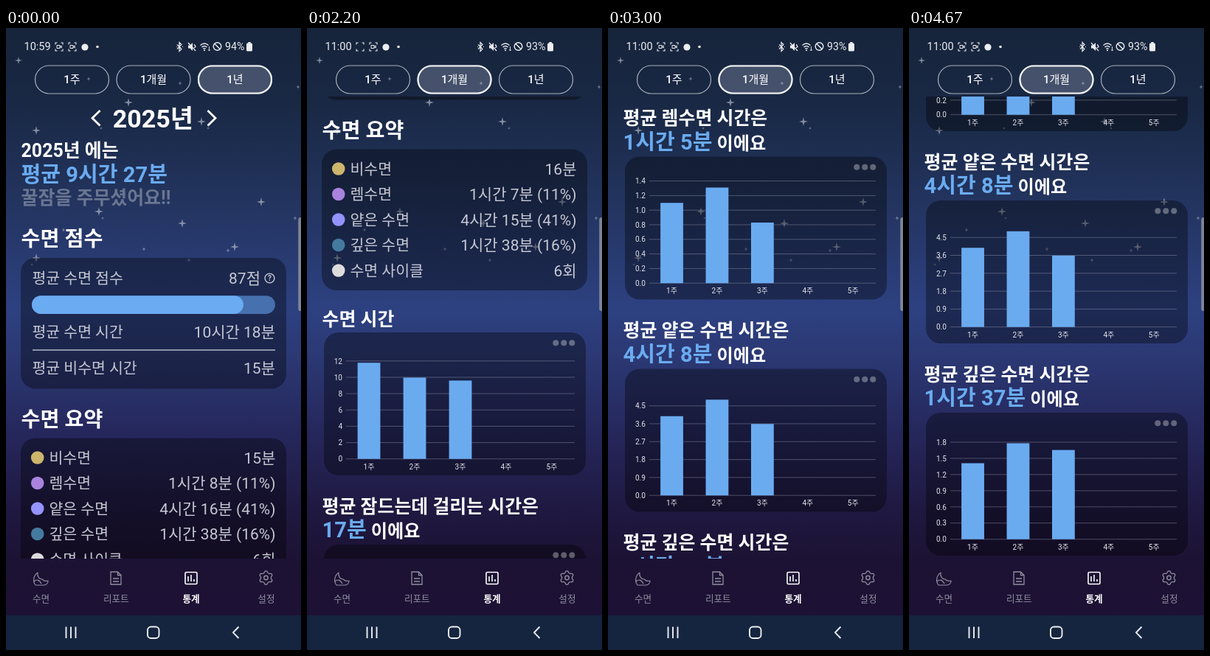
An HTML page for the animation above (5 s loop, 400x844 px).

```html
<!DOCTYPE html>
<html lang="ko">
<head>
<meta charset="utf-8">
<title>수면 통계</title>
<style>
html, body { margin: 0; width: 100%; height: 100%; overflow: hidden; background: #16243c; }
svg { display: block; width: 400px; height: 844px; }
text { font-family: Roboto, "Noto Sans CJK KR", "Noto Sans CJK", sans-serif; white-space: pre; }
</style>
</head>
<body>
<svg id="stage" viewBox="0 0 400 844">
  <defs>
    <linearGradient id="sky" x1="0" y1="0" x2="0" y2="1">
      <stop offset="0" stop-color="#16243b"/>
      <stop offset=".12" stop-color="#192844"/>
      <stop offset=".28" stop-color="#23345f"/>
      <stop offset=".45" stop-color="#2d4181"/>
      <stop offset=".53" stop-color="#2b3873"/>
      <stop offset=".66" stop-color="#25265a"/>
      <stop offset=".78" stop-color="#1f1840"/>
      <stop offset=".86" stop-color="#1c1233"/>
      <stop offset="1" stop-color="#1e1136"/>
    </linearGradient>
    <clipPath id="view"><rect y="93" width="400" height="627"/></clipPath>
  </defs>
  <rect width="400" height="844" fill="url(#sky)"/>
  <g id="stars" fill="#c9cdd8" opacity=".6"></g>
  <g clip-path="url(#view)"><g id="page"></g></g>
  <g id="chrome"></g>
</svg>
<script>
const LOOP = 5000, FRAME = 1000 / 15;
const BLUE = '#6aabf0', WHITE = '#fff', SOFT = '#c6c8d4', DIM = '#8f8e9f';
const LEFT = 20.6, BIG = 29.1, MID = 24.9, ROW = 20.5, VALUE = 21;
const $ = id => document.getElementById(id);

function add(parent, tag, attrs = {}) {
  const el = document.createElementNS('http://www.w3.org/2000/svg', tag);
  for (const key in attrs) el.setAttribute(key, attrs[key]);
  parent.appendChild(el);
  return el;
}
const rect = (p, x, y, width, height, rx, fill, more) =>
  add(p, 'rect', { x, y, width, height, rx, fill, ...more });
const dot = (p, cx, cy, r, fill, more) => add(p, 'circle', { cx, cy, r, fill, ...more });
const line = (p, d, stroke, width = 1, more) =>
  add(p, 'path', { d, stroke, 'stroke-width': width, fill: 'none', ...more });

// Text is placed by the vertical middle of its glyphs
function label(p, str, x, cy, size, fill = WHITE, weight = 400, anchor = 'start') {
  const el = add(p, 'text', {
    x, y: cy + size * 0.37, 'font-size': size, fill, 'font-weight': weight, 'text-anchor': anchor
  });
  el.textContent = str;
  return el;
}

// Background stars: x, y, radius
[[17, 44, 5], [41, 139, 6], [166, 101, 6], [265, 127, 6], [346, 236, 6], [126, 249, 6],
 [239, 265, 6], [310, 297, 6], [41, 312, 6], [112, 69, 3], [236, 75, 3], [396, 80, 3],
 [129, 136, 2], [274, 136, 2], [131, 258, 2], [78, 274, 3], [187, 300, 3], [301, 302, 3],
 [35, 321, 2], [392, 258, 3], [248, 315, 3]].forEach(([x, y, r]) => {
  const q = r * 0.2;
  add($('stars'), 'path', {
    d: `M${x} ${y - r}L${x + q} ${y - q}L${x + r} ${y}L${x + q} ${y + q}L${x} ${y + r}` +
       `L${x - q} ${y + q}L${x - r} ${y}L${x - q} ${y - q}Z`
  });
});

const page = $('page');
const card = (x, y, w, h) => rect(page, x, y, w, h, 20, '#000', { 'fill-opacity': 0.36 });

// Fixed parts of the summary
label(page, '꿀잠을 주무셨어요!!', LEFT, 230, MID, 'rgba(255,255,255,.33)', 700);
label(page, '수면 점수', LEFT, 286, 28.2, WHITE, 700);
card(20, 311.7, 360, 177.8);
['평균 수면 점수', '평균 수면 시간', '평균 비수면 시간'].forEach((s, i) =>
  label(page, s, 35.5, [339, 412, 461][i], ROW, SOFT));
label(page, '87점', 345, 339, VALUE, SOFT, 400, 'end');
dot(page, 357.5, 339.5, 6.4, 'none', { stroke: SOFT, 'stroke-width': 1.4 });
label(page, '?', 357.5, 339.5, 10, SOFT, 700, 'middle');
rect(page, 35, 363.2, 330, 24.8, 12.4, '#4670ae');
rect(page, 35, 363.2, 287, 24.8, 12.4, '#6aabf2');
line(page, 'M36 437H365', '#b4b8c8', 1.3);
label(page, '수면 요약', LEFT, 531, 28.2, WHITE, 700);
card(20, 556.5, 360, 191.5);

const rowY = i => 583 + i * 34.5;
[['비수면', '#cdb56c'], ['렘수면', '#a983dd'], ['얕은 수면', '#9493ff'],
 ['깊은 수면', '#457a9f'], ['수면 사이클', '#dcdcdc']].forEach(([name, color], i) => {
  dot(page, 42.7, rowY(i), 8.8, color);
  label(page, name, 58.5, rowY(i), ROW, SOFT);
});

// Values that depend on the chosen period
function period(title, half, intro, average, sleep, awake, rows) {
  const g = add(page, 'g');
  label(g, title, 199.5, 122, 34, WHITE, 700, 'middle');
  for (const side of [-1, 1]) {
    const x = 200.5 + side * half;
    line(g, `M${x - side * 10.5} 112L${x} 122.3L${x - side * 10.5} 132.6`, WHITE, 2.8);
  }
  label(g, intro, LEFT, 166, MID, WHITE, 700);
  label(g, average, LEFT, 198, BIG, BLUE, 700);
  label(g, sleep, 365, 412, VALUE, SOFT, 400, 'end');
  label(g, awake, 365, 461, VALUE, SOFT, 400, 'end');
  [awake, ...rows].forEach((s, i) => label(g, s, 365.5, rowY(i), VALUE, SOFT, 400, 'end'));
  return g;
}
const year = period('2025년', 83.5, '2025년 에는', '평균 9시간 27분', '10시간 18분', '15분',
  ['1시간 8분 (11%)', '4시간 16분 (41%)', '1시간 38분 (16%)', '6회']);
const month = period('2025년 5월', 113, '5월 한달 간', '평균 10시간 25분', '10시간 25분', '16분',
  ['1시간 7분 (11%)', '4시간 15분 (41%)', '1시간 38분 (16%)', '6회']);

// Bar chart card; gap is the distance between grid lines
function chart(top, step, count, gap, digits, values) {
  const left = digits ? 55.8 : 53, slot = (363 - left) / 5, zero = top + 171.7;
  card(23, top, 355, 194);
  for (let i = 0; i < 3; i++) dot(page, 337.3 + i * 11, top + 14.3, 4, WHITE, { opacity: 0.33 });
  for (let i = 0; i <= count; i++) {
    const y = zero - i * gap;
    line(page, `M${left} ${y}H363`, '#a4a6b8', 0.8, { opacity: 0.5 });
    label(page, (i * step).toFixed(digits), left - 5, y, 10, '#e4e5ec', 400, 'end');
  }
  for (let i = 0; i < 5; i++) {
    const x = left + slot * (i + 0.5), h = (values[i] || 0) / step * gap;
    if (h) rect(page, x - 15.4, zero - h, 30.8, h, 0, BLUE);
    label(page, i + 1 + '주', x, top + 182, 10, '#e4e5ec', 400, 'middle');
  }
}
function section(i, title, value, ...data) {
  const top = 1093 + i * 288;
  label(page, title, LEFT, top - 52.3, MID, WHITE, 700);
  const el = label(page, '', LEFT, top - 20.3, BIG, BLUE, 700);
  add(el, 'tspan').textContent = value;
  add(el, 'tspan', { 'font-size': 24.2, fill: WHITE }).textContent = ' 이에요';
  chart(top, ...data);
}
label(page, '수면 시간', LEFT, 787, MID, WHITE, 700);
chart(805, 2, 6, 22.15, 0, [11.78, 9.96, 9.6]);
section(0, '평균 잠드는데 걸리는 시간은', '17분', 4, 6, 21.76, 0, [14, 13, 23.2]);
section(1, '평균 렘수면 시간은', '1시간 5분', 0.2, 7, 19.8, 1, [1.1, 1.31, 0.83]);
section(2, '평균 얕은 수면 시간은', '4시간 8분', 0.9, 5, 24.3, 1, [3.98, 4.81, 3.59]);
section(3, '평균 깊은 수면 시간은', '1시간 37분', 0.3, 6, 21.95, 1, [1.41, 1.78, 1.655]);

// Period buttons
const chrome = $('chrome');
const buttons = ['1주', '1개월', '1년'].map((name, i) => {
  const x = 39.5 + i * 110.5;
  rect(chrome, x, 51, 100, 38, 19, 'none', { stroke: '#a9afbc', 'stroke-width': 1.2 });
  const lit = add(chrome, 'g', { opacity: 0 });
  rect(lit, x + 0.5, 51.5, 99, 37, 18.5, 'rgba(225,232,255,.22)', { stroke: '#f1f2f4', 'stroke-width': 2.2 });
  label(chrome, name, x + 50, 69.7, 15, WHITE, 500, 'middle');
  return lit;
});

// Status bar
const INK = '#eceef2';
const clock = label(chrome, '', 24.5, 25, 14.5, INK);
const battery = label(chrome, '', 297, 25, 14.2, INK);
const cams = [72, 90].map(x => {
  line(chrome, `M${x - 5} 22.5V20H${x - 2.5}M${x + 2.5} 20H${x + 5}V22.5M${x + 5} 28.5V31H${x + 2.5}` +
    `M${x - 2.5} 31H${x - 5}V28.5`, INK, 1.1);
  return line(chrome, `M${x - 3} 23.5H${x + 1}V27.5H${x - 3}ZM${x + 1} 25.5L${x + 3.2} 24V27Z`, INK, 1);
});
dot(chrome, 107, 26, 4.6, INK);
dot(chrome, 124, 25.5, 1.8, INK);
line(chrome, 'M232 22.5L238 28.5L235 31.5V19.5L238 22.5L232 28.5M231 25.5H231.8M239 25.5H240', INK, 1.2);
add(chrome, 'path', { d: 'M247 23.5H249.5L253 20V31L249.5 27.5H247Z', fill: INK });
line(chrome, 'M247 20L257 31M255 22.5L257 24.5M255 27L257.5 25', INK, 1.3);
line(chrome, 'M263.5 23.5Q269 18.5 274.5 23.5M265.5 26Q269 23 272.5 26M267.3 28.3Q269 27 270.7 28.3', INK, 1.4);
dot(chrome, 269, 30.2, 1, INK);
line(chrome, 'M275.5 25V31M274.2 29.5L275.5 31L276.8 29.5', INK, 0.9);
dot(chrome, 286.5, 25, 5.3, 'none', { stroke: INK, 'stroke-width': 1.4 });
line(chrome, 'M282.8 21.3L290.2 28.7', INK, 1.4);
rect(chrome, 326, 20.5, 8, 11, 1.5, INK);
rect(chrome, 328.3, 19, 3.4, 2, 0.5, INK);

// Edge handle
rect(chrome, 396.3, 257, 6, 127, 3, '#8e929f', { opacity: 0.85 });

// Tab bar
line(chrome, 'M43 739C37 743 36 751 40 756H51C55 756 57 753 57 750C54 751 51 750 49 748C45 748 42 744 43 739Z' +
  'M38 751C41 748 45 748 48 754', DIM, 1.2, { 'stroke-linejoin': 'round' });
line(chrome, 'M142 738H151.5L156 742.5V755H142ZM151.5 738V742.5H156M145 747H153M145 751H153', DIM, 1.3);
rect(chrome, 243, 738.5, 16, 16, 1.5, 'none', { stroke: WHITE, 'stroke-width': 1.6 });
line(chrome, 'M247 744V751M251 742V751M255 748V751', WHITE, 1.6);
let gear = '';
for (let i = 0; i < 24; i++) {
  const a = (i - 0.5) / 24 * 2 * Math.PI - Math.PI / 2, r = i % 4 < 2 ? 9.2 : 7;
  gear += `${i ? 'L' : 'M'}${352.5 + r * Math.cos(a)} ${746 + r * Math.sin(a)}`;
}
line(chrome, gear + 'Z', DIM, 1.3, { 'stroke-linejoin': 'round' });
dot(chrome, 352.5, 746, 2.7, 'none', { stroke: DIM, 'stroke-width': 1.4 });
['수면', '리포트', '통계', '설정'].forEach((s, i) => {
  const active = i === 2;
  label(chrome, s, 47.5 + i * 101.8, 774, 12.6, active ? WHITE : DIM, active ? 700 : 400, 'middle');
});

// System navigation
rect(chrome, 0, 797, 400, 47, 0, '#16253f');
line(chrome, 'M81.5 812.5V828M88 812.5V828M94.5 812.5V828', INK, 1.9);
rect(chrome, 192, 812.5, 15.5, 15.5, 4.5, 'none', { stroke: INK, 'stroke-width': 1.9 });
line(chrome, 'M315.5 812.5L308 820.3L315.5 828', INK, 1.9);

// Scroll path: time, offset, speed in px per ms
const path = [[1866, 0, 0], [1933.3, 13.5, 0.5], [2200, 392, 1.6], [2733.3, 1049, 0.75],
              [3266.7, 1312, 0.36], [3800, 1435, 0]];

function scrollAt(t) {
  if (t <= path[0][0]) return 0;
  const i = path.findIndex(p => p[0] >= t);
  if (i < 0) return 1435;
  const [t0, y0, v0] = path[i - 1], [t1, y1, v1] = path[i];
  const d = t1 - t0, u = (t - t0) / d, w = 1 - u;
  return w * w * ((1 + 2 * u) * y0 + u * d * v0) + u * u * ((3 - 2 * u) * y1 - w * d * v1);
}

// Overscroll stretch, anchored at the lower edge
function stretchAt(t) {
  if (t < 3800 || t > 4200) return 1;
  const s = t < 3933 ? (t - 3800) / 133 : (1 - (t - 3933) / 267) ** 2;
  return 1 + 0.0118 * s;
}

const show = (el, on) => el.setAttribute('visibility', on ? 'visible' : 'hidden');

function draw(ms) {
  const t = Math.floor((ms % LOOP + 5) / FRAME) * FRAME;
  const chosen = Math.min(1, Math.max(0, (t - 800) / 400));
  const monthly = t >= 1000;
  buttons[1].setAttribute('opacity', chosen);
  buttons[2].setAttribute('opacity', 1 - chosen);
  show(year, !monthly);
  show(month, monthly);
  clock.textContent = monthly ? '11:00' : '10:59';
  battery.textContent = monthly ? '93%' : '94%';
  show(cams[0], !(t > 2100 && t < 2500 || t > 3170 && t < 3570));
  page.setAttribute('transform',
    `translate(0 720) scale(1 ${stretchAt(t)}) translate(0 ${-720 - scrollAt(t)})`);
}

function tick() {
  draw(performance.now());
  requestAnimationFrame(tick);
}
tick();
</script>
</body>
</html>
```
